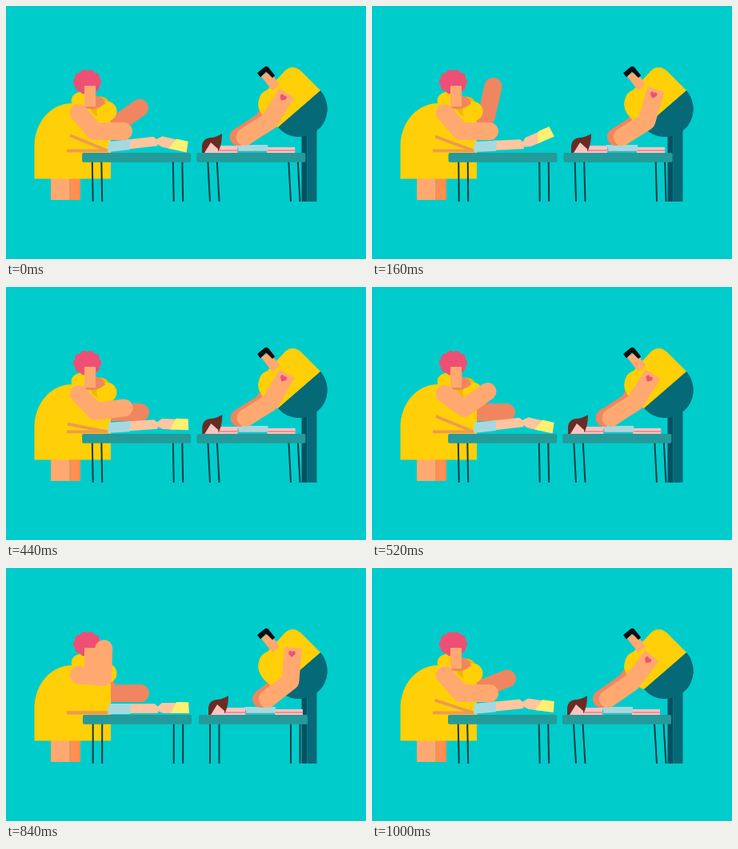
Recreate the animation shown at these times as an HTML page with a canvas. Size 450 by 317 pixels, loop 1040 ms.

```html
<!DOCTYPE html>
<html lang="en">
<head>
<meta charset="utf-8">
<title>Massage</title>
<style>
html, body { margin: 0; height: 100%; overflow: hidden; background: #00cccb; }
canvas { display: block; }
</style>
</head>
<body>
<canvas id="stage" width="450" height="317"></canvas>
<script>
const ctx = document.getElementById('stage').getContext('2d');
const { PI, sin, cos, min, max, hypot, acos, atan2 } = Math;
const LOOP = 1040, BEAT = 520, STEP = 40;
const C = {
  bg: '#00cccb', yellow: '#ffcf08', gold: '#f2b705', skin: '#ffa970', shade: '#f08660',
  orange: '#ff8f52', pink: '#ee5075', table: '#239b9b', leg: '#0d3c45', pants: '#056977',
  navy: '#075064', black: '#0c0c10', pale: '#ffc59f', limb: '#ee9a50', towel: '#a6d9df',
  blond: '#fff071', rose: '#fbc4c0', blush: '#f08f9c', brown: '#6b2b25'
};

const mod = (a, n) => (a % n + n) % n;
const clamp = v => max(0, min(1, v));

function shape(color, d) {
  ctx.fillStyle = color;
  ctx.fill(new Path2D(d));
}

function rect(color, ...box) {
  ctx.fillStyle = color;
  ctx.fillRect(...box);
}

function dot(color, x, y, r) {
  ctx.fillStyle = color;
  ctx.beginPath();
  ctx.arc(x, y, r, 0, 2 * PI);
  ctx.fill();
}

function line(color, width, points, cap = 'round') {
  ctx.strokeStyle = color;
  ctx.lineWidth = width;
  ctx.lineCap = cap;
  ctx.lineJoin = 'round';
  ctx.beginPath();
  points.forEach(p => ctx.lineTo(...p));
  ctx.stroke();
}

function placed(x, y, degrees, draw) {
  ctx.save();
  ctx.translate(x, y);
  ctx.rotate(degrees * PI / 180);
  draw();
  ctx.restore();
}

// The feet stay put while the top sways
function table(x, foot, sway) {
  for (const side of [0, 101])
    for (const gap of [0, 11.5])
      line(C.leg, 2, [[foot + side + gap + sway, 195], [foot + side + gap, 245]], 'butt');
  ctx.fillStyle = C.table;
  ctx.beginPath();
  ctx.roundRect(x + sway, 184, 136, 11.8, 2);
  ctx.fill();
}

// Slow swing up, quick slap down, then rest
function arm(color, shoulder, time, elbowX, reach, rise, length) {
  const t = mod(time + 100, LOOP) - 100;
  const u = clamp(min((t + 100) / 380, (440 - t) / 120));
  const raise = sin(u * PI / 2), angle = raise * 88 * PI / 180;
  const x = elbowX + reach * raise, y = 157 - rise * u;
  line(color, 22, [shoulder, [x, y], [x + length * cos(angle), y - length * sin(angle)]]);
}

function woman(time) {
  rect(C.skin, 56, 216, 23.5, 27);
  rect(C.orange, 79.5, 216, 13.5, 27);
  arm(C.shade, [120, 138], time, 130, 15, 28, 38);
  shape(C.yellow, 'M35.5 216.5V176C35.5 146 56 122 82 122Q80 111 91 108H99L112 126L131 145V216.5Z');
  dot(C.gold, 118, 126, 12.5);
  dot(C.yellow, 126, 132, 12.5);
  shape(C.shade, 'M98 112H112Q122 114 124 122Q114 132 98 128Z');
  for (let a = 0; a < 2 * PI; a += PI / 5)
    dot(C.pink, 101.5 + 12.5 * cos(a), 95 + 10.5 * sin(a), 5.3);
  dot(C.pink, 101.5, 95, 11);
  rect(C.skin, 98, 100, 14, 26);
}

// The jolt after each slap: legs and torso bounce, the head whips
function blondClient(time) {
  const u = clamp(mod(time + 120, BEAT) / 440);
  const bump = sin(PI * u ** .8), lift = 9.5 * bump * (1 - u), nod = 48 * u * sin(2 * PI * u);
  for (const angle of [0, 25 * bump])
    placed(127, 181.5, angle, () => rect(C.limb, -51, -2, 53, 3.8));
  placed(128, 183, -lift, () => {
    shape(C.pale, 'M24 -13H58L62 -9V-1H24Z');
    shape(C.towel, 'M-1 0L1 -13H29L27 0Z');
    placed(63, -7, nod + lift, () => {
      shape(C.pale, 'M-2 -2L4 -7L24 -7L21 6H6L-2 3Z');
      shape(C.blond, 'M22 -8H37L38 6H15Z');
    });
  });
}

function man() {
  rect(C.navy, 369.5, 145, 7, 100);
  rect(C.pants, 376.5, 145, 12, 100);
  shape(C.yellow, 'M393 106L340 152C326 146 312 132 316 118Q318 108 327 105L349 81Q358 73 368 81Z');
  shape(C.pants, 'M393 106A35 35 0 0 1 340 152Z');
  shape(C.skin, 'M319 88L329 82L342 98L333 106Z');
  shape(C.black, 'M314 84L324 76Q326 75 328 77L336 87L333 90L325 82L318 89Z');
}

function brownClient(lean) {
  placed(11 * lean - 1, 0, 0, () => {
    rect(C.rose, 262, 175, 27, 9);
    rect(C.rose, 326, 177, 35, 7);
    rect(C.blush, 262, 180, 99, 2);
    shape(C.towel, 'M288 174H327V181.5H291Z');
  });
  placed(244 + 9 * lean, 184, 0, () => {
    shape(C.brown, 'M0 0V-9Q1 -18 10 -19Q17 -19 25 -24Q25 -8 19 0Z');
    shape(C.rose, 'M3 0L11 -13L20 -5V0Z');
  });
}

// Two-bone reach from the sleeve to the hand
function manArm(color, lean, offset) {
  const upper = 42, fore = 36;
  const sx = 350 + 9 * lean + offset, sy = 110 - 10 * lean, hx = 295 + 32 * lean + offset, hy = 164;
  const reach = min(hypot(hx - sx, hy - sy), upper + fore);
  const bend = acos(min(1, (upper ** 2 + reach ** 2 - fore ** 2) / (2 * upper * reach)));
  const angle = atan2(hy - sy, hx - sx) - bend;
  const elbow = [sx + upper * cos(angle), sy + upper * sin(angle)];
  line(color, 22, [[sx, sy], elbow, [hx, hy]], 'butt');
  dot(color, hx, hy, 11);
  return [sx, sy, angle * 180 / PI - 90];
}

function draw(now) {
  const time = Math.floor(now % LOOP / STEP) * STEP;
  const phase = mod(time + 40, BEAT);
  const lean = phase < 360 ? phase / 360 : (1 + cos((phase - 360) / 160 * PI)) / 2;
  rect(C.bg, 0, 0, 450, 317);
  woman(time);
  blondClient(time);
  table(96, 108.7, lean - 1);
  arm(C.skin, [91, 134], time - BEAT, 111, 10, 20, 36);
  man();
  brownClient(lean);
  table(241, 255, 3 * (lean - 1));
  manArm(C.shade, lean, -8);
  // Torso in front of the far shoulder
  ctx.save();
  ctx.clip(new Path2D('M316 60H420V152H340C326 146 312 132 316 118Z'));
  man();
  ctx.restore();
  const shoulder = manArm(C.skin, lean, 0);
  placed(...shoulder, () => shape(C.pink, 'M-1 12L-5 8Q-6 4 -3 4Q-1 4 -1 6Q-1 4 1 4Q4 4 3 8Z'));
}

const start = performance.now();
function tick() {
  draw(performance.now() - start);
  requestAnimationFrame(tick);
}
tick();
</script>
</body>
</html>
```
